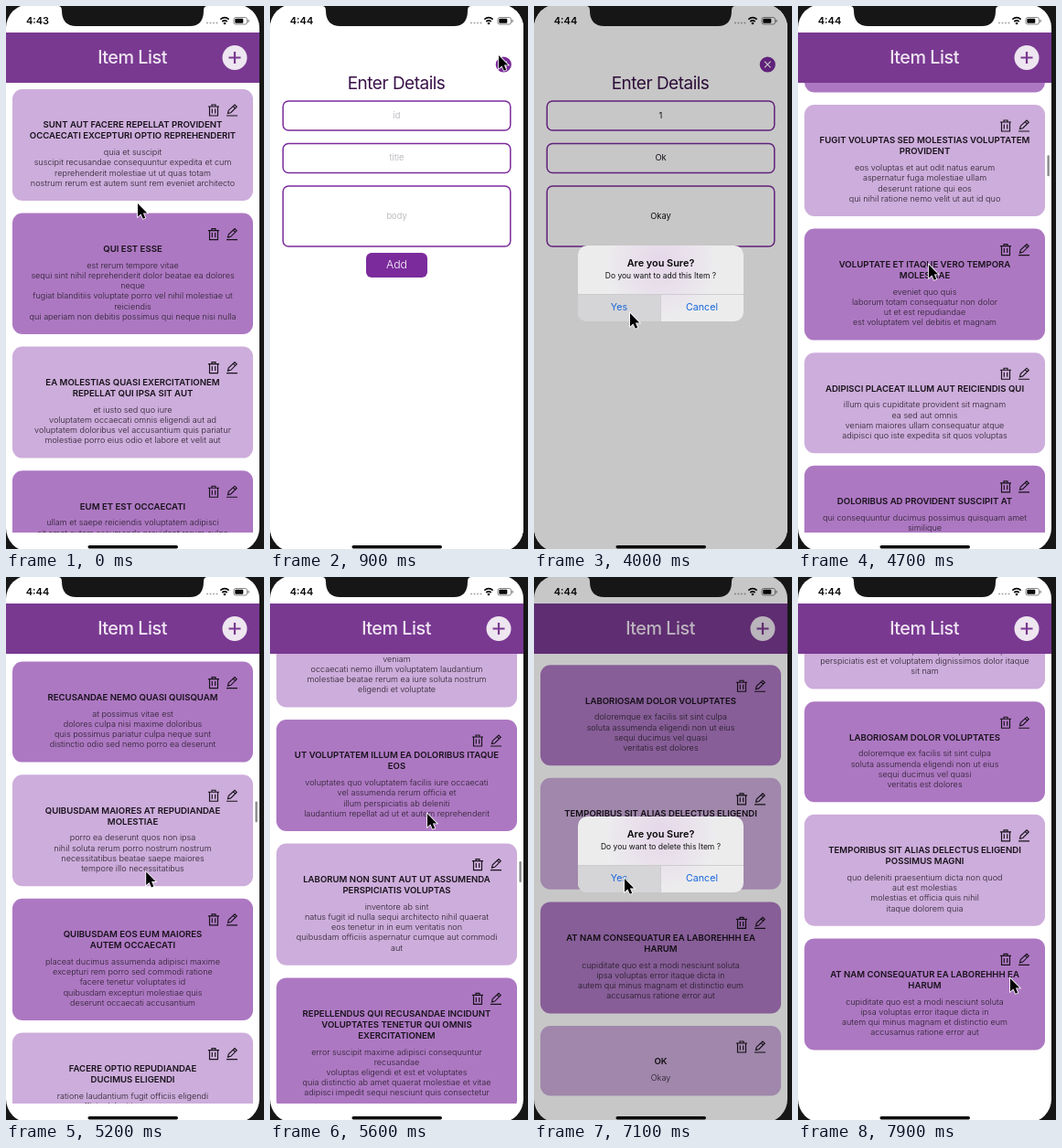
These frames come from a looping animation (282 by 594 pixels, 8 s). An HTML page with a canvas:

```html
<!DOCTYPE html>
<html lang="en">
<head>
<meta charset="utf-8">
<title>Item List</title>
<style>
html, body { margin: 0; width: 100%; height: 100%; overflow: hidden; background: #161616; }
canvas { display: block; width: 282px; height: 594px; }
</style>
</head>
<body>
<canvas id="stage"></canvas>
<script>
const W = 282, H = 594, LOOP = 8000, STEP = 100;
const LIST_TOP = 84, LIST_END = 576, MID = 138.5;
const PURPLE = '#7b2b9c', INK = '#18121b';
const canvas = document.getElementById('stage');
const dpr = window.devicePixelRatio || 1;
canvas.width = W * dpr;
canvas.height = H * dpr;
const c = canvas.getContext('2d');

// Title lines / body lines, by item number.
const posts = {
  1: 'SUNT AUT FACERE REPELLAT PROVIDENT|OCCAECATI EXCEPTURI OPTIO REPREHENDERIT/quia et suscipit|suscipit recusandae consequuntur expedita et cum|reprehenderit molestiae ut ut quas totam|nostrum rerum est autem sunt rem eveniet architecto',
  2: 'QUI EST ESSE/est rerum tempore vitae|sequi sint nihil reprehenderit dolor beatae ea dolores|neque|fugiat blanditiis voluptate porro vel nihil molestiae ut|reiciendis|qui aperiam non debitis possimus qui neque nisi nulla',
  3: 'EA MOLESTIAS QUASI EXERCITATIONEM|REPELLAT QUI IPSA SIT AUT/et iusto sed quo iure|voluptatem occaecati omnis eligendi aut ad|voluptatem doloribus vel accusantium quis pariatur|molestiae porro eius odio et labore et velit aut',
  4: 'EUM ET EST OCCAECATI/ullam et saepe reiciendis voluptatem adipisci|sit amet autem assumenda provident rerum culpa|quis hic commodi nesciunt rem tenetur doloremque|ipsam iure|quis sunt voluptatem rerum illo velit',
  17: 'FUGIT VOLUPTAS SED MOLESTIAS VOLUPTATEM|PROVIDENT/eos voluptas et aut odit natus earum|aspernatur fuga molestiae ullam|deserunt ratione qui eos|qui nihil ratione nemo velit ut aut id quo',
  18: 'VOLUPTATE ET ITAQUE VERO TEMPORA|MOLESTIAE/eveniet quo quis|laborum totam consequatur non dolor|ut et est repudiandae|est voluptatem vel debitis et magnam',
  19: 'ADIPISCI PLACEAT ILLUM AUT REICIENDIS QUI/illum quis cupiditate provident sit magnam|ea sed aut omnis|veniam maiores ullam consequatur atque|adipisci quo iste expedita sit quos voluptas',
  20: 'DOLORIBUS AD PROVIDENT SUSCIPIT AT/qui consequuntur ducimus possimus quisquam amet|similique|suscipit porro ipsam amet|eos veritatis officiis exercitationem vel fugit aut|necessitatibus totam',
  47: 'QUIBUSDAM CUMQUE REM AUT DESERUNT/voluptatem assumenda ut qui ut cupiditate aut impedit|veniam|occaecati nemo illum voluptatem laudantium|molestiae beatae rerum ea iure soluta nostrum|eligendi et voluptate',
  48: 'UT VOLUPTATEM ILLUM EA DOLORIBUS ITAQUE|EOS/voluptates quo voluptatem facilis iure occaecati|vel assumenda rerum officia et|illum perspiciatis ab deleniti|laudantium repellat ad ut et autem reprehenderit',
  49: 'LABORUM NON SUNT AUT UT ASSUMENDA|PERSPICIATIS VOLUPTAS/inventore ab sint|natus fugit id nulla sequi architecto nihil quaerat|eos tenetur in in eum veritatis non|quibusdam officiis aspernatur cumque aut commodi|aut',
  50: 'REPELLENDUS QUI RECUSANDAE INCIDUNT|VOLUPTATES TENETUR QUI OMNIS|EXERCITATIONEM/error suscipit maxime adipisci consequuntur|recusandae|voluptas eligendi et est et voluptates|quia distinctio ab amet quaerat molestiae et vitae|adipisci impedit sequi nesciunt quis consectetur',
  97: 'QUAS FUGIAT UT PERSPICIATIS VERO|PROVIDENT/eum non blanditiis soluta porro quibusdam voluptas|vel voluptatem qui placeat dolores qui velit aut|vel inventore aut cumque culpa explicabo aliquid at|perspiciatis est et voluptatem dignissimos dolor itaque|sit nam',
  98: 'LABORIOSAM DOLOR VOLUPTATES/doloremque ex facilis sit sint culpa|soluta assumenda eligendi non ut eius|sequi ducimus vel quasi|veritatis est dolores',
  99: 'TEMPORIBUS SIT ALIAS DELECTUS ELIGENDI|POSSIMUS MAGNI/quo deleniti praesentium dicta non quod|aut est molestias|molestias et officia quis nihil|itaque dolorem quia',
  100: 'AT NAM CONSEQUATUR EA LABOREHHH EA|HARUM/cupiditate quo est a modi nesciunt soluta|ipsa voluptas error itaque dicta in|autem qui minus magnam et distinctio eum|accusamus ratione error aut',
  101: 'OK/Okay'
};
const words = [...new Set(Object.values(posts).slice(0, 12).join(' ').toLowerCase().split(/[ |\/]/))];

function random(seed) {
  const x = Math.sin(seed * 12.9898) * 43758.5453;
  return x - Math.floor(x);
}
function filler(seed, length) {
  let line = '';
  while (line.length < length) line += ' ' + words[Math.floor(random(seed++) * words.length)];
  return line.trim();
}
function invent(n) {
  const title = [filler(n * 91, 24)], body = [];
  if (random(n) > 0.4) title.push(filler(n * 53, 9));
  for (let i = 0; i < 4 + (n % 3 == 0); i++) body.push(filler(n * 37 + i * 11, 18 + 18 * random(n + i)));
  return title.join('|').toUpperCase() + '/' + body.join('|');
}

const cards = [];
for (let n = 1, top = 7; n <= 101; n++) {
  const [title, body] = (posts[n] || invent(n)).split('/').map(s => s.split('|'));
  const height = 53.2 + 12 * title.length + 11.2 * body.length;
  cards.push({ title, body, top, height, fill: n % 2 ? '#cdaddb' : '#ad78c2' });
  top += height + 13.6;
}
const scrollTo = (n, y) => LIST_TOP + cards[n - 1].top - y;
const END = scrollTo(101, 491);

const scrollKeys = [[4450, 0], [4700, scrollTo(17, 108)], [5600, scrollTo(48, 156)], [6000, END],
  [7700, END], [7900, END - 40], [8000, END - 62]];
const cursorKeys = [[0, 143, 216], [100, 143, 216], [450, 249, 54], [900, 249, 54], [1200, 139, 118],
  [1500, 139, 122], [1800, 139, 165], [2000, 35, 497], [2300, 235, 416], [2500, 221, 455],
  [2800, 139, 226], [3000, 235, 416], [3200, 221, 455], [3400, 28, 455], [3550, 152, 416],
  [3700, 139, 281], [3900, 104, 336], [4200, 104, 336], [4450, 142, 340], [4700, 142, 283],
  [5100, 150, 330], [5600, 171, 259], [6100, 109, 506], [6400, 226, 513], [6600, 226, 513],
  [7000, 98, 330], [7300, 98, 330], [7900, 231, 439]];

// Interpolates rows of [time, ...values].
function track(t, keys, linear) {
  const i = keys.findIndex(k => k[0] > t);
  if (i == 0) return keys[0].slice(1);
  if (i < 0) return keys[keys.length - 1].slice(1);
  const a = keys[i - 1], b = keys[i];
  let p = (t - a[0]) / (b[0] - a[0]);
  if (!linear) p = p * p * (3 - 2 * p);
  return a.slice(1).map((v, j) => v + (b[j + 1] - v) * p);
}

function text(s, x, y, size, color = INK, weight = 400, spacing = 0) {
  c.font = `${weight} ${size}px Inter, "Liberation Sans", sans-serif`;
  c.letterSpacing = spacing + 'px';
  c.textAlign = 'center';
  c.textBaseline = 'middle';
  c.fillStyle = color;
  c.fillText(s, x, y);
}
function box(x, y, w, h, r, fill) {
  c.beginPath();
  c.roundRect(x, y, w, h, r);
  c.fillStyle = fill;
  c.fill();
}
function disc(x, y, r, fill) {
  c.beginPath();
  c.arc(x, y, r, 0, 7);
  c.fillStyle = fill;
  c.fill();
}
function line(path, color, width) {
  c.strokeStyle = color;
  c.lineWidth = width;
  c.stroke(new Path2D(path));
}
function at(x, y, draw) {
  c.save();
  c.translate(x, y);
  draw();
  c.restore();
}

function drawCard(card, y) {
  box(7, y, 263, card.height, 11, card.fill);
  at(227, y + 23, () => line('M-6-4H6M-2-4V-6H2V-4M-4.5-4V6H4.5V-4M-1.7-1.5V3.5M1.7-1.5V3.5', INK, 1.15));
  at(247, y + 23, () => line('M-6 6H6M-4.5 3.5L-3.7 .2L3-6L5.2-3.8L-1.3 2.7ZM1.2-4.4L3.5-2.2', INK, 1.15));
  card.title.forEach((s, i) => text(s, MID, y + 39.5 + 12 * i, 9.6, INK, 600));
  const start = y + 45.4 + 12 * card.title.length;
  card.body.forEach((s, i) => text(s, MID, start + 11.2 * i, 9.1, '#2a202e', 300));
}

function drawList(t) {
  const [scroll] = track(t, scrollKeys, true);
  const count = t >= 4200 && t < 7500 ? 101 : 100;
  c.fillStyle = '#fff';
  c.fillRect(0, 0, W, H);
  c.save();
  c.beginPath();
  c.rect(0, LIST_TOP, W, LIST_END - LIST_TOP);
  c.clip();
  for (const card of cards.slice(0, count)) {
    const y = LIST_TOP + card.top - scroll;
    if (y < LIST_END && y + card.height > LIST_TOP) drawCard(card, y);
  }
  if (t >= 4450 && t < 6400) box(272.5, 86 + 466 * scroll / END, 2.2, 23, 1.1, '#858187');
  c.restore();
  c.fillStyle = '#793991';
  c.fillRect(0, 29, W, 55);
  text('Item List', 138, 57, 19.8, '#f0e5f3', 500, -0.5);
  disc(250, 56.5, 13.5, '#eee6f0');
  line('M243.5 56.5H256.5M250 50V63', '#793991', 2.2);
}

function drawField(y, h, value, hint, active) {
  c.beginPath();
  c.roundRect(14.2, y, 248.6, h, 6);
  c.strokeStyle = PURPLE;
  c.lineWidth = 1.5;
  c.stroke();
  const mid = y + h / 2;
  text(value || hint, MID, mid - 0.3, 9.3, value ? INK : '#bdbac0');
  if (active) {
    const half = c.measureText(value || hint).width / 2;
    box(MID + (value ? half + 1 : -half - 1), mid - 6, 1.5, 12, 0, PURPLE);
  }
}

function drawKey(label, x, y, w, size, fill = '#fff') {
  box(x, y + 1, w, 29.5, 4, '#898b91');
  box(x, y, w, 29.5, 4, fill);
  text(label, x + w / 2, y + 14.7, size, '#080808');
}

function drawKeyboard(t) {
  const caps = t < 2300 || (t >= 2800 && t < 3000);
  const grey = '#abaeb9';
  c.fillStyle = '#cfd0d7';
  c.fillRect(0, 368, W, 240);
  line('M92.5 373V392M184.5 373V392', '#bcbec5', 1);
  ['QWERTYUIOP', 'ASDFGHJKL', 'ZXCVBNM'].forEach((row, r) => {
    [...row].forEach((k, i) => {
      const x = [3, 16.7, 44.7][r] + 27.5 * i;
      drawKey(caps ? k : k.toLowerCase(), x, 403.5 + 37.3 * r, 23, 15);
    });
  });
  drawKey('', 3, 478, 30, 10, caps ? '#fff' : grey);
  at(18, 493, () => {
    const arrow = 'M0-6L6.5 .5H3V5.5H-3V.5H-6.5Z';
    if (caps) {
      c.fillStyle = '#000';
      c.fill(new Path2D(arrow));
    } else line(arrow, '#111', 1.1);
  });
  drawKey('', 244.5, 478, 29.5, 10, grey);
  at(259, 493, () => line('M-8 0L-3-5H7V5H-3ZM-.5-2.2L4 2.2M4-2.2L-.5 2.2', '#111', 1.1));
  drawKey('123', 3, 515.5, 65, 10.5, grey);
  drawKey('space', 72, 515.5, 133.5, 10.5);
  drawKey('return', 209.5, 515.5, 64.5, 10.5, grey);
  at(28, 572, () => {
    line('M-8.5 0A8.5 8.5 0 1 1 8.5 0A8.5 8.5 0 1 1-8.5 0M-5 2Q0 9 5 2Z', '#50525a', 1.3);
    disc(-3, -2.5, 1.2, '#50525a');
    disc(3, -2.5, 1.2, '#50525a');
  });
  at(250, 571, () => line('M-3-6A3 3 0 0 1 3-6V1A3 3 0 0 1-3 1ZM-6-1V1A6 6 0 0 0 6 1V-1M0 7V10M-3.5 10H3.5', '#50525a', 1.3));
}

function typed(t, word, times) {
  return word.slice(0, times.filter(x => t >= x).length);
}

function drawForm(t) {
  c.fillStyle = '#fff';
  c.fillRect(0, 0, W, H);
  disc(255.3, 64, 8.6, PURPLE);
  line('M252 60.7L258.6 67.3M258.6 60.7L252 67.3', '#fff', 1.2);
  text('Enter Details', 138, 85, 19, '#3a1249', 400, -0.5);
  drawField(104, 32, typed(t, '1', [1600]), 'id', t >= 1200 && t < 1900);
  drawField(150.5, 32, typed(t, 'Ok', [2300, 2500]), 'title', t >= 1900 && t < 2800);
  drawField(197, 66, typed(t, 'Okay', [3000, 3200, 3400, 3500]), 'body', t >= 2800 && t < 3700);
  box(105, 270, 67, 27, 6, PURPLE);
  text('Add', MID, 283.5, 12.3, '#fff', 300);
  const [up] = track(t, [[1200, 0], [1500, 1], [3700, 1], [3900, 0]]);
  if (up) at(0, (1 - up) * 230, () => drawKeyboard(t));
}

function drawAlert(t, start, end, verb) {
  const [alpha] = track(t, [[start, 0], [start + 200, 1], [end, 1], [end + 200, 0]]);
  if (!alpha) return;
  c.save();
  c.globalAlpha = alpha;
  c.fillStyle = 'rgba(0,0,0,.22)';
  c.fillRect(0, 0, W, H);
  const zoom = t < end ? 1.1 - 0.1 * alpha : 1;
  c.translate(MID, 303);
  c.scale(zoom, zoom);
  c.translate(-MID, -303);
  const tint = c.createRadialGradient(MID, 282, 8, MID, 282, 62);
  tint.addColorStop(0, '#e6d9ea');
  tint.addColorStop(1, '#ececed');
  box(48, 262, 181, 83, 10, tint);
  if (t >= start + 200 && t <= end) box(48, 315.5, 90, 29.5, [0, 0, 0, 10], '#d5d4d6');
  line('M48 315.5H229M138.5 315.5V345', '#c9c7cb', 0.8);
  text('Are you Sure?', MID, 281.5, 10.9, '#080808', 600);
  text(`Do you want to ${verb} this Item ?`, MID, 295.5, 8.5, '#111');
  text('Yes', 93, 330, 10.7, '#1767dc');
  text('Cancel', 183.5, 330, 10.7, '#1767dc');
  c.restore();
}

function drawStatus(t) {
  text(t < 500 ? '4:43' : '4:44', 34.5, 16.5, 11, '#080808', 600);
  for (let i = 0; i < 4; i++) disc(220 + 3.5 * i, 18.5, 1, '#a5a5a5');
  line('M234.3 14.7Q239 10.7 243.7 14.7M236.3 17Q239 14.8 241.7 17', '#080808', 1.7);
  disc(239, 19, 1.3, '#080808');
  c.beginPath();
  c.roundRect(249, 12.5, 14.5, 7.5, 2);
  c.strokeStyle = '#777';
  c.lineWidth = 0.9;
  c.stroke();
  box(250.3, 13.8, 9, 4.9, 1, '#080808');
  box(264.5, 14.8, 1.2, 3, 0.6, '#777');
}

function drawCursor(x, y) {
  at(x, y, () => {
    const arrow = new Path2D('M1 0V14.5L4.4 11.4L6.8 16.8L9.2 15.7L6.9 10.5H11.3Z');
    c.fillStyle = '#000';
    c.strokeStyle = '#fff';
    c.lineWidth = 1.6;
    c.stroke(arrow);
    c.fill(arrow);
  });
}

function draw(t) {
  c.setTransform(dpr, 0, 0, dpr, 0, 0);
  c.fillStyle = '#161616';
  c.fillRect(0, 0, W, H);
  c.save();
  c.beginPath();
  c.roundRect(0, -2, 277, 599, 26);
  c.clip();
  drawList(t);
  const [form] = track(t, [[500, 0], [900, 1], [4150, 1], [4450, 0]]);
  if (form) at(0, (1 - form) * H, () => drawForm(t));
  drawStatus(t);
  drawAlert(t, 3700, 4000, 'add');
  drawAlert(t, 6400, 7300, 'delete');
  c.fillStyle = '#161616';
  c.fill(new Path2D('M57 0Q61 0 61 5Q61 22 77 22H201Q216 22 216 5Q216 0 220 0Z'));
  box(89.5, 590, 98.5, 3.4, 1.7, '#080808');
  c.restore();
  drawCursor(...track(t, cursorKeys));
}

const began = performance.now();
function frame() {
  const t = (performance.now() - began) % LOOP;
  draw(Math.floor(t / STEP) * STEP);
  requestAnimationFrame(frame);
}
frame();
</script>
</body>
</html>
```
